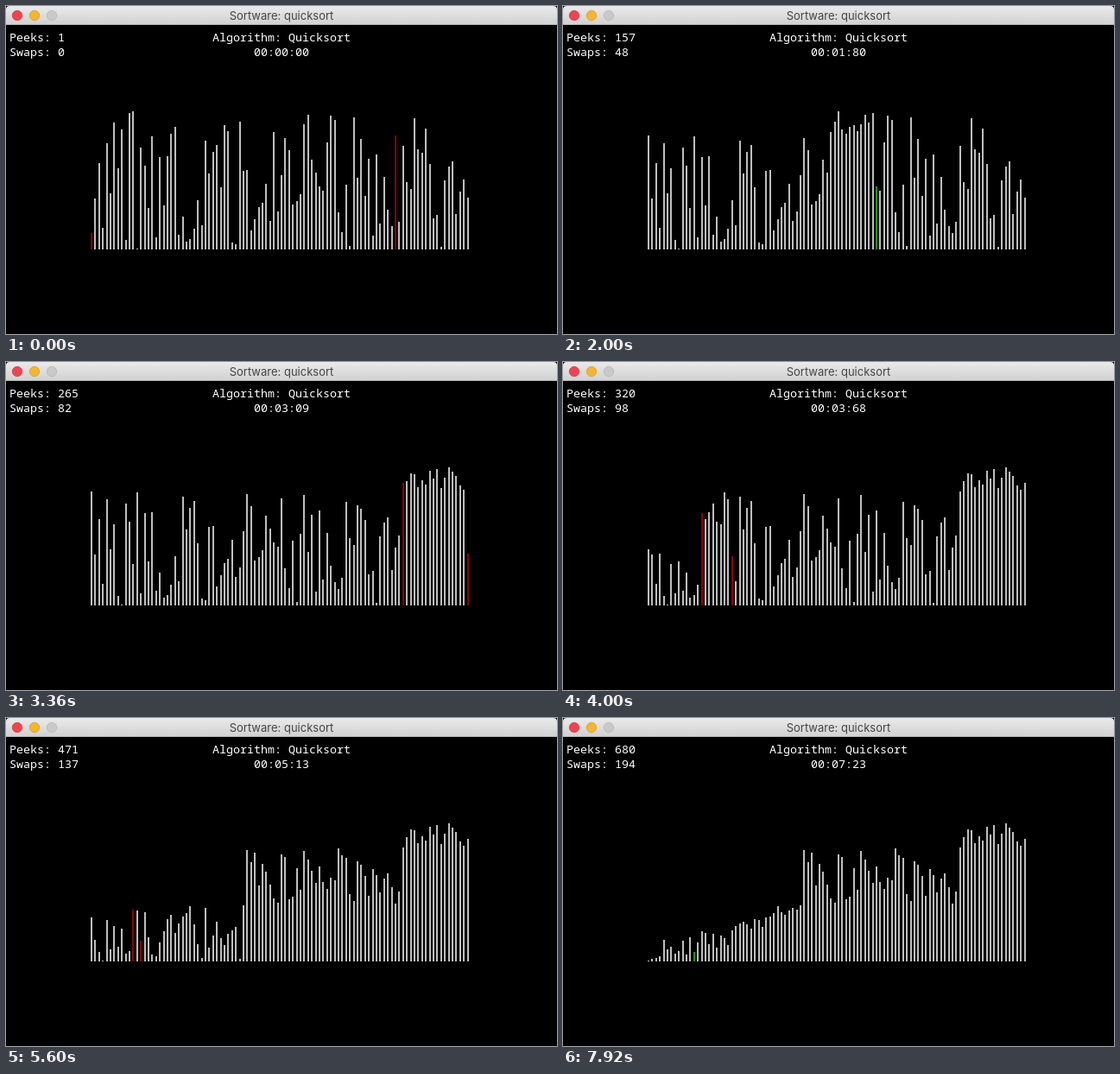
Animation of 638 by 380 pixels, one loop 8000 ms. Source, as an HTML page with a canvas:

```html
<!DOCTYPE html>
<html lang="en">
<head>
<meta charset="utf-8">
<title>Sortware: quicksort</title>
<style>
  html, body { margin: 0; width: 100%; height: 100%; overflow: hidden; background: #000; }
  #stage { position: relative; width: 638px; height: 380px; overflow: hidden; }
  canvas { position: absolute; left: 0; top: 0; }
  .text { position: absolute; white-space: pre; color: #fff;
          font: 500 13.333px/17px "Noto Sans Mono", "DejaVu Sans Mono", monospace; }
  .mid { left: 0; width: 638px; text-align: center; }
  #title { top: 3px; color: #454545; font: 400 13px/17px Inter, Roboto, sans-serif; }
</style>
</head>
<body>
<div id="stage">
  <canvas id="view" width="638" height="380"></canvas>
  <div id="title" class="text mid">Sortware: quicksort</div>
  <div class="text" style="left:4px;top:28px">Peeks: <span id="peeks"></span></div>
  <div class="text" style="left:4px;top:45px">Swaps: <span id="swaps"></span></div>
  <div class="text mid" style="top:28px">Algorithm: Quicksort</div>
  <div class="text mid" style="top:45px" id="clock"></div>
</div>
<script>
const LOOP = 8000, TICK = 80;
const SWAP_COST = 36, PEEK_COST = 0.85;
const BASE = 282, LEFT = 98, PITCH = 4.4, UNIT = 1.6;
const GREY = '#bebebe', RED = '#8c0008', GREEN = '#1f961f';

const values = [
  12, 37, 63, 16, 77, 41, 92, 59, 87, 7, 99, 100, 1, 74, 61, 30, 82, 9, 67, 32,
  68, 84, 89, 11, 24, 6, 8, 15, 36, 18, 79, 55, 71, 76, 45, 90, 86, 5, 4, 93,
  57, 58, 14, 22, 31, 34, 48, 21, 85, 28, 54, 81, 72, 33, 35, 40, 91, 98, 65, 56,
  46, 43, 78, 97, 94, 27, 13, 47, 3, 96, 52, 80, 39, 66, 10, 69, 19, 53, 29, 17,
  83, 20, 75, 49, 44, 95, 73, 70, 88, 62, 23, 25, 2, 50, 60, 64, 26, 42, 51, 38
];
const pivots = [83, 41, 32, 4, 2, 23, 16];

// Run the sort once and keep every visible step.
const steps = [];
let peeks = 0, swaps = 0, cost = 0;

function record(marks, color, length) {
  steps.push({ bars: values.slice(), marks, color, peeks, swaps, start: cost, mid: cost + length / 2 });
  cost += length;
}

function peek(i) {
  peeks++;
  record([i], GREEN, PEEK_COST);
  return values[i];
}

function swap(i, j) {
  peeks++;
  record([i, j], RED, SWAP_COST);
  peeks++;
  [values[i], values[j]] = [values[j], values[i]];
  swaps++;
}

function quicksort(lo, hi) {
  if (lo >= hi || !pivots.length) return;
  swap(lo, values.indexOf(pivots.shift()));
  const pivot = peek(lo);
  let store = lo + 1;
  for (let j = lo + 1; j <= hi; j++) {
    if (peek(j) < pivot) swap(store++, j);
  }
  swap(lo, store - 1);
  quicksort(lo, store - 2);
  quicksort(store, hi);
}
quicksort(0, values.length - 1);

// Pace: tick, peek count and clock in hundredths.
const pace = [
  [0, 1, 0], [13, 83, 96], [34, 221, 257], [49, 320, 368],
  [59, 399, 440], [80, 547, 593], [98, 680, 723]
].map(([tick, count, time]) => ({ tick, time, at: steps.find(s => s.peeks === count).mid }));

const ctx = document.getElementById('view').getContext('2d');
const label = id => document.getElementById(id);
const two = n => String(n).padStart(2, '0');

function drawTitleBar() {
  const shade = ctx.createLinearGradient(0, 0, 0, 22);
  shade.addColorStop(0, '#eaeaea');
  shade.addColorStop(1, '#d0d0d0');
  ctx.fillStyle = shade;
  ctx.beginPath();
  ctx.roundRect(0, 0, 638, 22, [4, 4, 0, 0]);
  ctx.fill();
  ctx.fillStyle = '#b4b4b4';
  ctx.fillRect(0, 21, 638, 1);
  [['#ee4452', '#d63a48'], ['#f5b52e', '#dc9f2a'], ['#c9c9c9', '#b5b5b5']].forEach(([fill, edge], i) => {
    ctx.beginPath();
    ctx.arc(13 + 20 * i, 11, 5.7, 0, 2 * Math.PI);
    ctx.fillStyle = fill;
    ctx.strokeStyle = edge;
    ctx.lineWidth = 0.8;
    ctx.fill();
    ctx.stroke();
  });
}

function drawBars(step) {
  step.bars.forEach((v, i) => {
    const h = Math.floor(v * UNIT + 1e-6);
    ctx.fillStyle = step.marks.includes(i) ? step.color : GREY;
    ctx.fillRect(Math.round(LEFT + PITCH * i), BASE - h, 2, h);
  });
}

function render(ms) {
  const tick = Math.max(0, Math.floor(ms / TICK) - 1);
  const k = Math.max(1, pace.findIndex(p => p.tick >= tick));
  const a = pace[k - 1], b = pace[k];
  const f = (tick - a.tick) / (b.tick - a.tick);
  const at = a.at + (b.at - a.at) * f;
  const time = Math.round(a.time + (b.time - a.time) * f);
  const step = steps.findLast(s => s.start <= at);

  ctx.fillStyle = '#000';
  ctx.fillRect(0, 0, 638, 380);
  drawTitleBar();
  drawBars(step);
  label('peeks').textContent = step.peeks;
  label('swaps').textContent = step.swaps;
  label('clock').textContent = `00:${two(Math.floor(time / 100))}:${two(time % 100)}`;
}

let origin = null;
function loop(now) {
  if (origin === null) origin = now;
  render(Math.max(0, now - origin) % LOOP);
  requestAnimationFrame(loop);
}
render(0);
requestAnimationFrame(loop);
</script>
</body>
</html>
```
